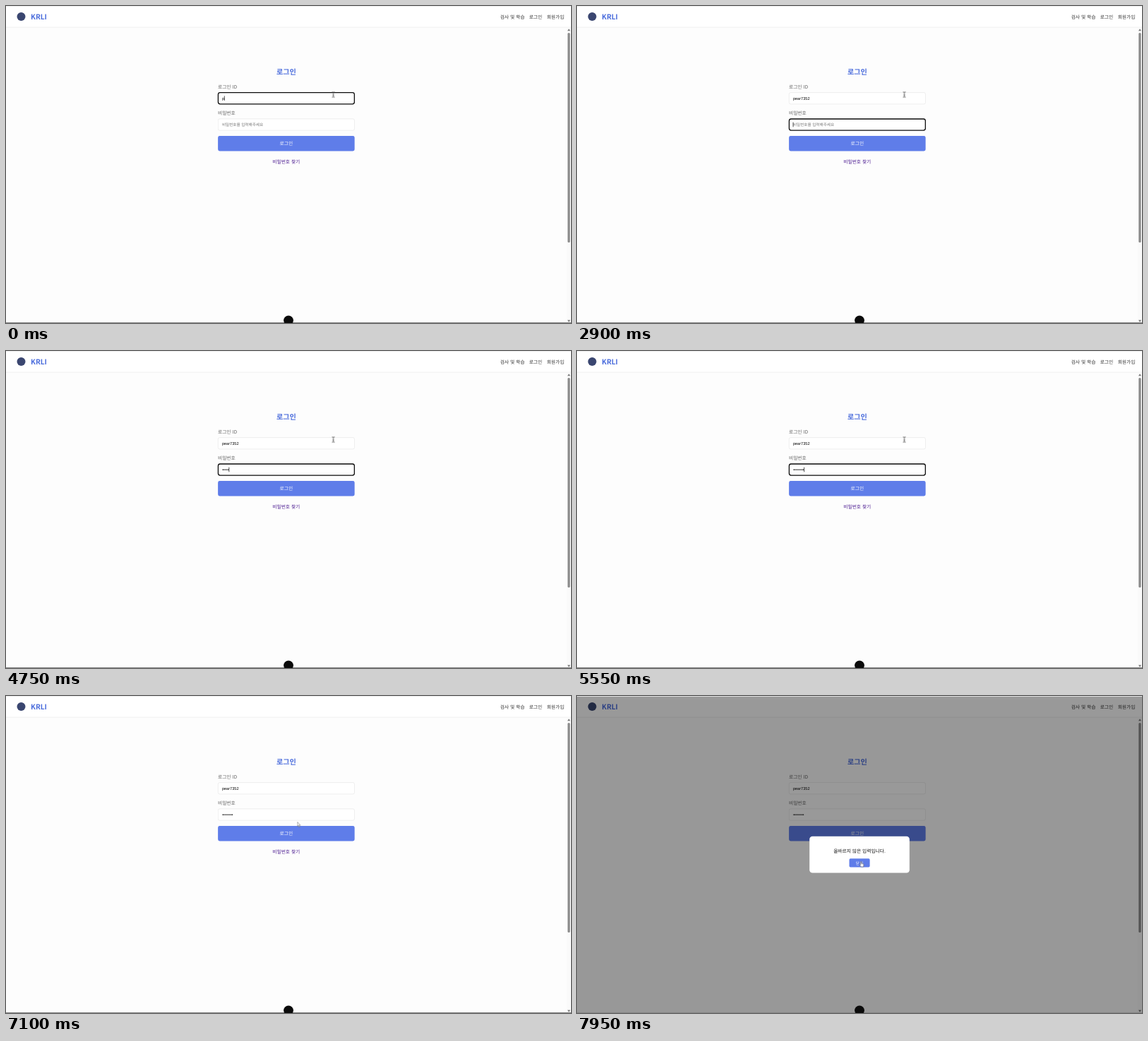
Animation, 800 px wide and 449 px high, one loop 8000 ms. Source, as an HTML page:

```html
<!DOCTYPE html>
<html lang="ko">
<head>
<meta charset="utf-8">
<title>로그인</title>
<style>
  html, body { margin: 0; width: 100%; height: 100%; overflow: hidden; background: #fdfdfd; }
  svg { display: block; width: 800px; height: 449px; }
  text {
    font: 6.72px "Noto Sans CJK KR", "Noto Sans CJK", sans-serif;
    fill: #333; text-rendering: geometricPrecision; white-space: pre;
  }
  .mid { text-anchor: middle; }
  .label { fill: #666; }
  .brand, .title { font-size: 10.08px; font-weight: 700; fill: #4a6cdc; }
  .small { font-size: 5.6px; }
  .hint { fill: #757575; }
  .typed { font: 5.6px "Liberation Sans", Arial, sans-serif; fill: #000; }
  .light { fill: #fff; }
  .link { fill: #4b1a90; }
  .field { fill: #fff; stroke: #ddd; stroke-width: .5; }
  .ring { fill: #fff; stroke: #0c0c0c; stroke-width: 1.3; }
  .blue { fill: #5f7de9; }
  .caret { fill: #000; }

  .ring, #modal, #pointer, #beam, #arrow, #hand { animation: 8s step-end infinite; }
  #idRing { animation-name: id-focus; }
  #pwRing { animation-name: pw-focus; }
  #modal { animation-name: modal; }
  #beam { animation-name: beam; }
  #arrow { animation-name: arrow; }
  #hand { animation-name: hand; }
  #pointer { animation-name: travel; animation-timing-function: ease-in-out; }

  @keyframes id-focus { 0% { opacity: 1 } 35.3%, 100% { opacity: 0 } }
  @keyframes pw-focus { 0% { opacity: 0 } 35.3% { opacity: 1 } 82.8%, 100% { opacity: 0 } }
  @keyframes modal { 0% { opacity: 0 } 89.1%, 100% { opacity: 1 } }
  @keyframes beam { 0% { opacity: 1 } 78.5%, 100% { opacity: 0 } }
  @keyframes arrow { 0% { opacity: 0 } 78.5% { opacity: 1 } 96.3%, 100% { opacity: 0 } }
  @keyframes hand { 0% { opacity: 0 } 96.3%, 100% { opacity: 1 } }
  @keyframes travel {
    0%, 76% { transform: translate(463.5px, 125.5px) }
    82%, 92.5% { transform: translate(412.5px, 178.5px) }
    98%, 100% { transform: translate(402.3px, 234.3px) }
  }
</style>
</head>
<body>
<svg viewBox="0 0 800 449">
  <rect width="800" height="449" fill="#fdfdfd"/>
  <rect width="800" height="30" fill="#fff"/>
  <rect y="29.8" width="800" height=".6" fill="#e6e6e6"/>

  <circle cx="21.5" cy="15" r="6" fill="#3a4670"/>
  <text class="brand" x="35" y="19">KRLI</text>
  <text x="699.7" y="17.6">검사 및 학습</text>
  <text x="740.7" y="17.6">로그인</text>
  <text x="765.7" y="17.6">회원가입</text>

  <rect x="793.6" y="30.4" width="6.4" height="418" fill="#fafafa"/>
  <rect x="795.3" y="38" width="3.3" height="297" rx="1.6" fill="#8b8b8b"/>
  <path d="M795 35.3h4l-2-3zM795 444.7h4l-2 3z" fill="#777"/>

  <text class="title mid" x="396.8" y="96.8">로그인</text>

  <text class="label" x="300" y="117.1">로그인 ID</text>
  <rect class="field" x="300.3" y="122.6" width="193.1" height="16.3" rx="2.2"/>
  <rect class="ring" id="idRing" x="300.4" y="122.7" width="192.9" height="16.1" rx="2.8"/>
  <text class="typed" id="idText" x="305.9" y="132.7"></text>
  <rect class="caret" id="idCaret" y="127.4" width=".7" height="6.6"/>

  <text class="label" x="300" y="154.3">비밀번호</text>
  <rect class="field" x="300.3" y="159.9" width="193.1" height="16.3" rx="2.2"/>
  <rect class="ring" id="pwRing" x="300.4" y="160" width="192.9" height="16.1" rx="2.8"/>
  <text class="small hint" id="hint" x="305.9" y="170">비밀번호를 입력해주세요</text>
  <text class="typed" id="pwText" x="305.9" y="169.9"></text>
  <rect class="caret" id="pwCaret" y="164.7" width=".7" height="6.6"/>

  <rect class="blue" x="300.1" y="184" width="193.5" height="21.5" rx="2.4"/>
  <text class="light mid" x="396.8" y="197.3">로그인</text>
  <text class="link mid" x="396.8" y="223.1">비밀번호 찾기</text>

  <g id="modal">
    <rect y=".6" width="800" height="448" fill="#000" opacity=".4"/>
    <rect x="329.2" y="198.8" width="141.6" height="51.8" rx="4.2" fill="#fff"/>
    <text class="mid" x="400" y="221.5" style="fill:#111">올바르지 않은 입력입니다.</text>
    <rect class="blue" x="385.5" y="230.2" width="29.1" height="12.2" rx="1.7"/>
    <text class="small light mid" x="400" y="238.5">닫기</text>
  </g>

  <rect width="800" height=".6" fill="#e4e4e4"/>
  <rect y="448" width="800" height="1" fill="#858585"/>
  <circle cx="400" cy="445.3" r="6.9" fill="#0b0b0b"/>

  <g id="pointer">
    <path id="beam" d="M-2-3.8q1.6 0 2 .8q.4-.8 2-.8M0-3V3M-2 3.8q1.6 0 2-.8q.4.8 2 .8M-1 .9h2"
      fill="none" stroke="#444" stroke-width=".8"/>
    <path id="arrow" d="M0 0V6L1.4 4.8L2.4 7L3.4 6.6L2.5 4.4H4.3Z"
      fill="#fff" stroke="#444" stroke-width=".5"/>
    <path id="hand" d="M-.7.6q.7-1.2 1.4 0V3L3 3.5q1 .4.8 1.5L3.2 7.8H-.2L-2 5q-.2-1 .7-.8L-.7 4.7Z"
      fill="#fff" stroke="#333" stroke-width=".5"/>
  </g>
</svg>
<script>
  const LOOP = 8000, BLINK = 515, PW_FOCUS = 2824, BLUR = 6624;
  const $ = id => document.getElementById(id);

  const fields = [
    { name: 'id', text: 'pear7352', from: 0, to: PW_FOCUS,
      keys: [0, 125, 325, 575, 1875, 2025, 2175, 2325] },
    { name: 'pw', text: '•'.repeat(8), from: PW_FOCUS, to: BLUR,
      keys: [3825, 3975, 4225, 4425, 4625, 4825, 5025, 5225] }
  ];

  function draw(field, t) {
    const label = $(field.name + 'Text'), caret = $(field.name + 'Caret');
    const count = field.keys.filter(k => k <= t).length;
    const text = field.text.slice(0, count);
    if (label.textContent !== text) label.textContent = text;
    const last = Math.max(field.from, count ? field.keys[count - 1] : 0);
    const on = t >= field.from && t < field.to && (t - last) % (2 * BLINK) < BLINK;
    caret.setAttribute('x', 305.7 + (count ? label.getComputedTextLength() : 0));
    caret.setAttribute('opacity', on ? 1 : 0);
    return count;
  }

  let start;
  function tick(now) {
    start ??= now;
    const t = (now - start) % LOOP;
    const [, dots] = fields.map(f => draw(f, t));
    $('hint').setAttribute('opacity', dots ? 0 : 1);
    requestAnimationFrame(tick);
  }
  requestAnimationFrame(tick);
</script>
</body>
</html>
```
